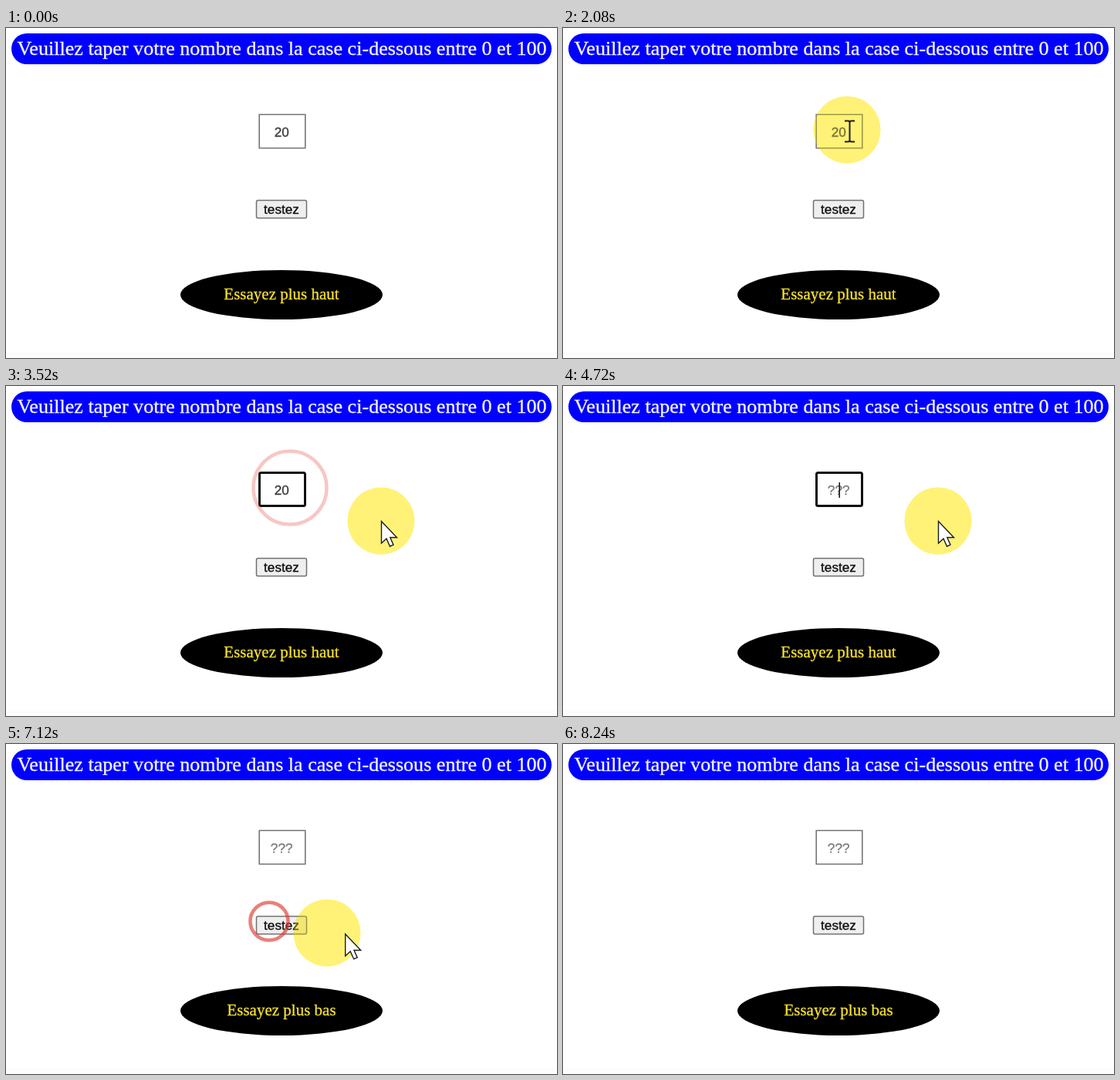
These frames come from a looping animation (714x428 px, 9.52 s). An HTML page with a canvas:

```html
<!DOCTYPE html>
<html lang="fr">
<head>
<meta charset="utf-8">
<title>Devinez le nombre</title>
<style>
  html, body { margin: 0; width: 100%; height: 100%; overflow: hidden; background: #fff; }
  canvas { display: block; }
</style>
</head>
<body>
<canvas id="stage" width="714" height="428"></canvas>
<script>
const ctx = document.getElementById('stage').getContext('2d');
const LOOP = 9520, STEP = 80, HALO_LAG = 40, BLINK = 530, RING_LIFE = 1150;
const FOCUS = 2640, BLUR = 6720, SUBMIT = 6800, LEAVE = 8240;
const SERIF = '"Liberation Serif", serif', SANS = '"Liberation Sans", sans-serif';

const OUTSIDE = { x: 770, y: 190 };
const FIELD = { x: 368, y: 132 };
const ASIDE = { x: 486, y: 175 };
const LEFT = { x: 199, y: 143 };
const BUTTON = { x: 341, y: 230 };
const BELOW = { x: 416, y: 245 };
const RIGHT = { x: 590, y: 252 };

// Each move glides on from wherever the previous one ended.
const moves = [
  { start: 80, end: 560, to: FIELD },
  { start: 2960, end: 3400, to: ASIDE },
  { start: 5880, end: 5960, to: LEFT },
  { start: 5960, end: 6400, to: BUTTON },
  { start: 6950, end: 7080, to: BELOW },
  { start: 7080, end: 7380, to: RIGHT }
];

function pointerAt(t) {
  let { x, y } = OUTSIDE;
  for (const { start, end, to } of moves) {
    const k = Math.min(1, Math.max(0, (t - start) / (end - start)));
    x += (to.x - x) * k;
    y += (to.y - y) * k;
  }
  return [x, y];
}

function text(str, x, y, font, color) {
  ctx.font = font;
  ctx.fillStyle = ctx.strokeStyle = color;
  ctx.lineWidth = 0.35;
  ctx.textAlign = 'center';
  ctx.fillText(str, x, y);
  ctx.strokeText(str, x, y);
}

function box(x, y, w, h, radius, fill, stroke, line) {
  ctx.beginPath();
  ctx.roundRect(x, y, w, h, radius);
  ctx.fillStyle = fill;
  ctx.fill();
  if (!stroke) return;
  ctx.strokeStyle = stroke;
  ctx.lineWidth = line;
  ctx.stroke();
}

// The field is cleared, then 80 is typed; submitting empties it again.
function fieldAt(t) {
  if (t < 4400) return { value: '20' };
  if (t < 4880) return { value: '', edited: 4400 };
  if (t < 5040) return { value: '8', edited: 4880 };
  if (t < SUBMIT) return { value: '80', edited: 5040 };
  return { value: '' };
}

function drawField(t) {
  const focused = t >= FOCUS && t < BLUR;
  if (focused) box(328.5, 112.5, 59, 43, 2, '#fff', '#101010', 3);
  else box(328.2, 112.2, 59.6, 43.6, 0, '#fff', '#767676', 1.6);

  const { value, edited } = fieldAt(t);
  text(value || '???', 357.2, 141, `17.2px ${SANS}`, value ? '#3c3c3c' : '#7c7c7c');
  if (focused && edited && (t - edited) % (2 * BLINK) < BLINK) {
    const x = 357.5 + (value ? ctx.measureText(value).width / 2 - 1 : 0);
    ctx.fillStyle = '#111';
    ctx.fillRect(x, 125, 1.5, 20);
  }
}

function drawPage(t) {
  ctx.fillStyle = '#fff';
  ctx.fillRect(0, 0, 714, 428);
  ctx.fillStyle = '#fcfcfc';
  ctx.fillRect(0, 420, 714, 8);
  box(7, 7, 700, 40, 20, '#00f');
  text('Veuillez taper votre nombre dans la case ci-dessous entre 0 et 100', 357.5, 35, `26.1px ${SERIF}`, '#f4f4ff');
  drawField(t);
  box(324.5, 223.6, 65, 22.8, 2, '#efefef', '#707070', 1.5);
  text('testez', 357, 241, `17.2px ${SANS}`, '#111');
  ctx.beginPath();
  ctx.ellipse(357, 346, 131, 32, 0, 0, 7);
  ctx.fillStyle = '#000';
  ctx.fill();
  text(t < SUBMIT ? 'Essayez plus haut' : 'Essayez plus bas', 357, 352, `21px ${SERIF}`, '#f4e030');
}

function drawRing(age, { x, y }) {
  if (age < 0 || age >= RING_LIFE) return;
  const radius = 60 * age / RING_LIFE;
  ctx.beginPath();
  ctx.arc(x, y, radius, 0, 7);
  ctx.strokeStyle = `rgba(220,50,40,${1 - radius / 65})`;
  ctx.lineWidth = 4.6;
  ctx.stroke();
}

function drawHalo(x, y) {
  ctx.beginPath();
  ctx.arc(x, y, 43.5, 0, 7);
  ctx.fillStyle = '#fef276';
  ctx.globalCompositeOperation = 'multiply';
  ctx.fill();
  ctx.globalCompositeOperation = 'source-over';
  ctx.globalAlpha = 0.3;
  ctx.fill();
  ctx.globalAlpha = 1;
}

const arrow = new Path2D('M0 0V28.5L6.5 22.5 11 32.5 15.5 30.5 11.3 21H20Z');
const beam = new Path2D('M-6.5 -13.5H-2Q0 -13.5 0 -11.5V11.5Q0 13.5 -2 13.5H-6.5M6.5 -13.5H2Q0 -13.5 0 -11.5M6.5 13.5H2Q0 13.5 0 11.5');

function drawPointer(x, y) {
  const overField = x > 328 && x < 388 && y > 112 && y < 156;
  ctx.save();
  ctx.translate(x + (overField ? 3.5 : 0.5), y + (overField ? 2 : 0.5));
  ctx.strokeStyle = '#1c1c1c';
  ctx.lineWidth = overField ? 2 : 1.4;
  if (!overField) {
    ctx.fillStyle = '#fff';
    ctx.fill(arrow);
  }
  ctx.stroke(overField ? beam : arrow);
  ctx.restore();
}

function frame() {
  const t = Math.floor(performance.now() % LOOP / STEP) * STEP;
  drawPage(t);
  if (t < LEAVE) drawHalo(...pointerAt(t - HALO_LAG));
  drawRing(t - 2610, FIELD);
  drawRing(t - 6650, BUTTON);
  if (t < LEAVE) drawPointer(...pointerAt(t));
  requestAnimationFrame(frame);
}
requestAnimationFrame(frame);
</script>
</body>
</html>
```
